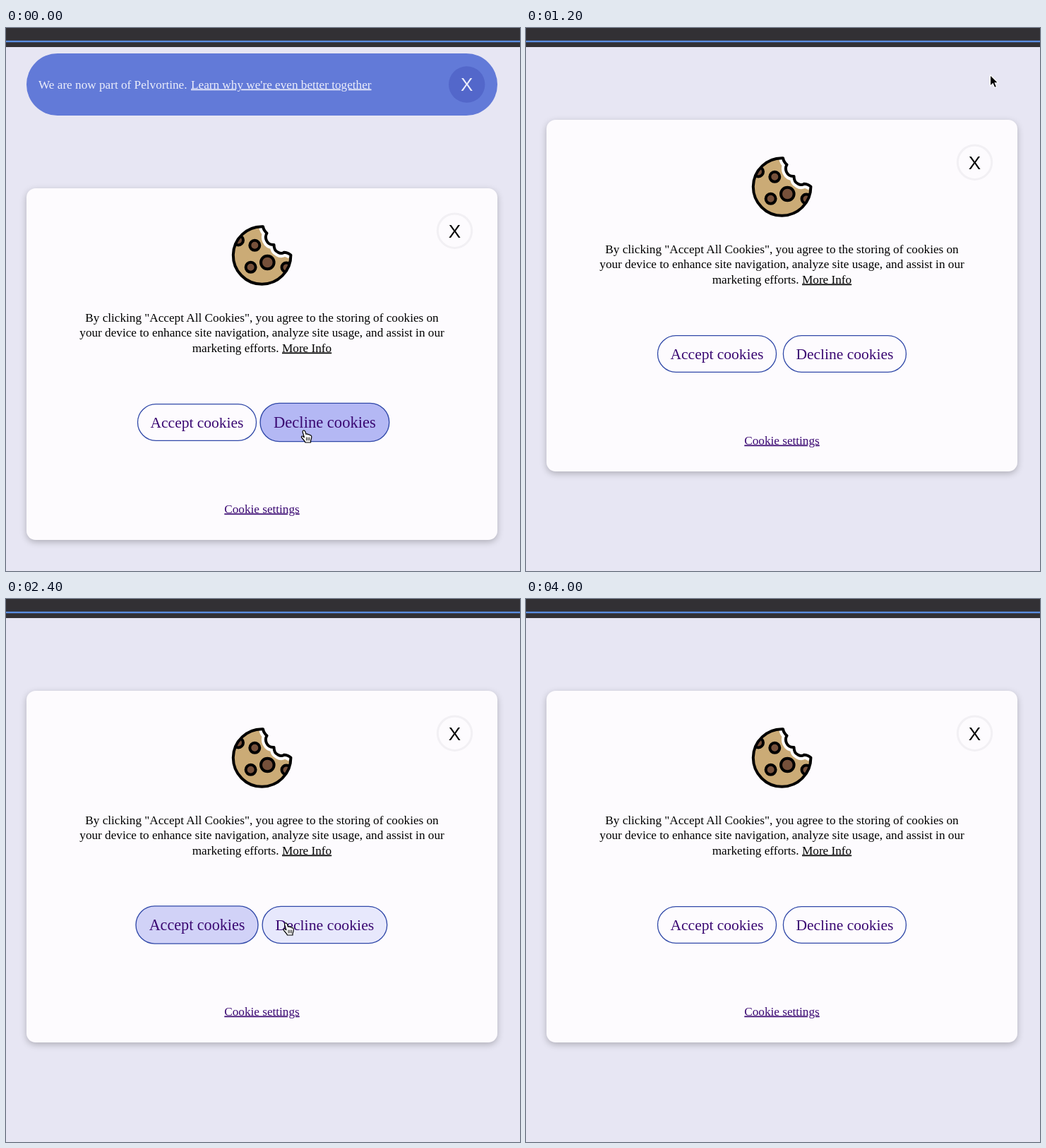
Write an HTML page that moves like this. It is 728 px wide and 769 px high and loops after 4200 ms.

```html
<!DOCTYPE html>
<html lang="en">
<head>
<meta charset="utf-8">
<title>Cookie consent</title>
<style>
  html, body { margin: 0; width: 100%; height: 100%; overflow: hidden; background: #e7e6f3; }
  svg { display: block; width: 100%; height: 100%; }
  text { font: 17.2px "Liberation Serif", "Times New Roman", serif; }
  .mid { text-anchor: middle; }
  .link { text-decoration: underline; }
  .close { font: 26px "Liberation Sans", Arial, sans-serif; text-anchor: middle; }
  .panel { fill: #fdfbfe; filter: drop-shadow(0 3px 5px rgba(0, 0, 0, .24)); }
  .btn text { font-size: 21.5px; fill: #3a0872; text-anchor: middle; }
  .btn rect { fill: #b4b8f4; stroke: #3048a8; stroke-width: 1.3; }
</style>
</head>
<body>
<svg viewBox="0 0 728 769">
  <defs>
    <path id="dough" d="M364 281.2A40.8 40.8 0 1 0 403.4 321.5Q398 317.6 393.5 317.8Q390 320.5 385 317.5Q379.5 315 379.5 307Q372 307.5 369 301Q366.500 295.500 369.500 290.500Q365 287 364 281.200Z"/>
    <clipPath id="inside"><use href="#dough"/></clipPath>
  </defs>

  <rect width="728" height="27" fill="#323034"/>
  <rect y="17.800" width="728" height="2.400" fill="#5b8ee0"/>

  <g id="banner">
    <rect x="29" y="36" width="667" height="88" rx="44" fill="#627ad8"/>
    <g fill="#eceefb">
      <text x="46" y="85.500">We are now part of Pelvortine.</text>
      <text x="262" y="85.500" class="link">Learn why we're even better together</text>
    </g>
    <circle cx="652.700" cy="80" r="25.700" fill="#5367ca"/>
    <text x="652.700" y="88.500" class="close" fill="#eceefb">X</text>
  </g>

  <g id="modal">
    <rect class="panel" x="29" y="227" width="667" height="498" rx="13"/>
    <circle cx="635.500" cy="287.200" r="24.200" fill="none" stroke="#f2f0f4" stroke-width="3"/>
    <text x="635.500" y="296.500" class="close">X</text>

    <g stroke="#000" stroke-width="4">
      <use href="#dough" fill="#cbab76" stroke="none"/>
      <g clip-path="url(#inside)" fill="#76503a">
        <circle cx="329" cy="300.500" r="7"/>
        <circle cx="352.300" cy="307.800" r="7"/>
        <circle cx="370.300" cy="332" r="9.300"/>
        <circle cx="346.600" cy="338.800" r="7"/>
        <circle cx="397" cy="339" r="6.500"/>
        <path d="M403.400 321.500Q398 317.600 393.500 317.800Q390 320.500 385 317.500Q379.500 315 379.500 307Q372 307.500 369 301Q366.500 295.500 369.500 290.500Q365 287 364 281.200" fill="none" stroke="#fff" stroke-width="12"/>
      </g>
      <use href="#dough" fill="none" stroke-linejoin="round"/>
    </g>

    <text x="362.500" y="415.500" class="mid">By clicking "Accept All Cookies", you agree to the storing of cookies on</text>
    <text x="362.500" y="437" class="mid">your device to enhance site navigation, analyze site usage, and assist in our</text>
    <text x="263.700" y="458.500">marketing efforts.</text>
    <text x="391" y="458.500" class="link">More Info</text>

    <g id="accept" class="btn">
      <rect x="-84" y="-25.800" width="168" height="51.600" rx="25.800"/>
      <text y="7.300">Accept cookies</text>
    </g>
    <g id="decline" class="btn">
      <rect x="-87" y="-25.800" width="174" height="51.600" rx="25.800"/>
      <text y="7.300">Decline cookies</text>
    </g>
    <text x="362.500" y="686.500" class="mid link" fill="#3a0872">Cookie settings</text>
  </g>

  <g id="arrow">
    <path d="M.500 .500V16.200L4.200 12.800L6.700 18.500L9.500 17.300L7.100 11.700H11.600Z" fill="#000" stroke="#fff" stroke-width="1.100"/>
  </g>
  <g id="hand" stroke="#000" stroke-linecap="round">
    <path d="M3.500 1C5 .500 6 1.500 6.500 3L7.500 6.200C9 5.500 10 6 10.300 6.800C11.500 6.200 12.700 6.800 12.900 7.800C14.200 7.400 15.300 8.300 15.300 9.800C15.300 13 14.500 14 14 16V18H6.500C6 16 2.500 13 1 10.600C.500 9 2.500 8.300 4 10L5 11L2.700 3.500C2.400 2 2.700 1.200 3.500 1Z" fill="#fff" stroke-width="1.200"/>
    <path d="M8 11V15M10.200 11V15M12.400 11V15" stroke-width=".900"/>
  </g>
</svg>
<script>
  const LOOP = 4200, BANNER_GONE = 1200, RISE = 97;
  const el = id => document.getElementById(id);

  // time, pointer, x, y, accept hover, decline hover
  const steps = [
    [0, 'hand', 417.5, 569, 0, 1],
    [200, 'arrow', 653, 82, 0, .3],
    [400, 'arrow', 653, 75, 0, 0],
    [600, 'arrow', 656, 71, 0, 0],
    [800, 'arrow', 657, 66, 0, 0],
    [1400, 'arrow', 357, 300, 0, 0],
    [1600, 'arrow', 343, 370, 0, 0],
    [1800, 'hand', 274, 458, .2, 0],
    [2000, 'hand', 271, 461, 1, 0],
    [2200, 'hand', 273, 461, 1, 0],
    [2400, 'hand', 392, 458, .6, .3],
    [2600, 'hand', 408, 456, 0, 1],
    [3000, 'none', 0, 0, 0, .5],
    [3200, 'none', 0, 0, 0, 0]
  ];

  function hover(id, x, amount) {
    const button = el(id);
    button.setAttribute('transform', `translate(${x} 558.500) scale(${1 + .05 * amount})`);
    button.firstElementChild.setAttribute('fill-opacity', amount);
  }

  function draw(t) {
    const [, pointer, x, y, accept, decline] = steps.findLast(s => s[0] <= t);
    const gone = t >= BANNER_GONE;
    el('banner').style.display = gone ? 'none' : '';
    el('modal').setAttribute('transform', `translate(0 ${gone ? -RISE : 0})`);
    hover('accept', 270.5, accept);
    hover('decline', 451.4, decline);
    for (const id of ['arrow', 'hand']) {
      el(id).style.display = id === pointer ? '' : 'none';
      el(id).setAttribute('transform', `translate(${x} ${y})`);
    }
  }

  const start = performance.now();
  function tick() {
    draw((performance.now() - start) % LOOP);
    requestAnimationFrame(tick);
  }
  tick();
</script>
</body>
</html>
```
